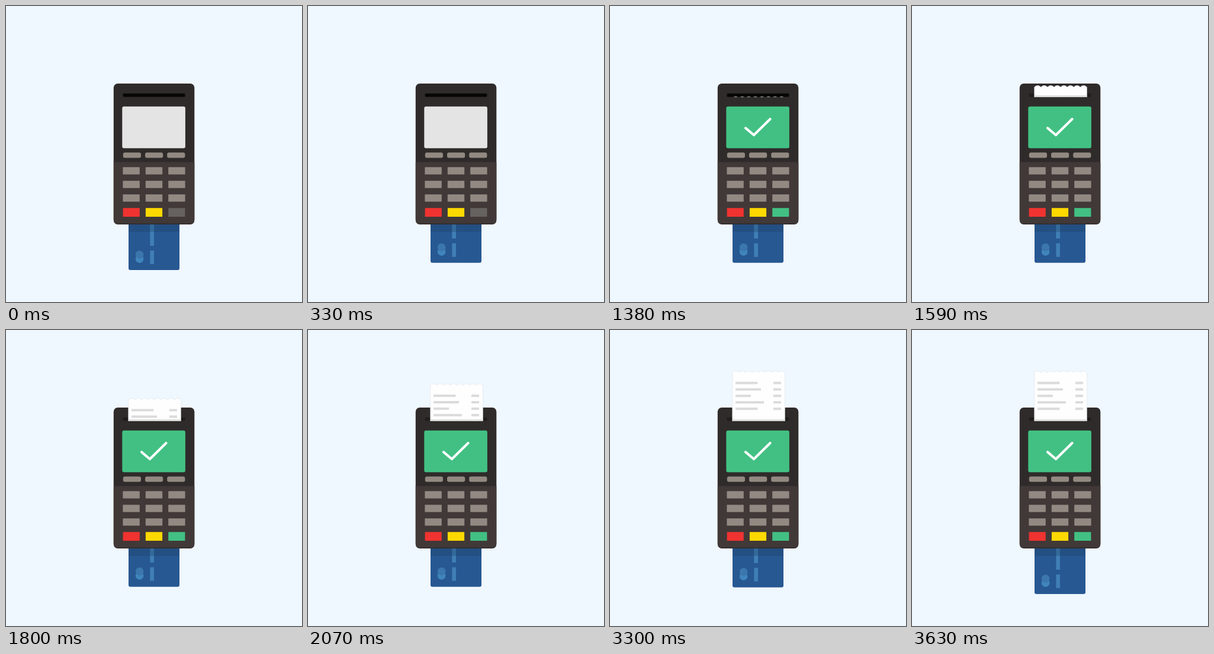
An HTML page for the animation above (4530 ms loop, 500 by 500 pixels).

```html
<!DOCTYPE html>
<html lang="en">
<head>
<meta charset="utf-8">
<title>Card payment</title>
<style>
  html, body { margin: 0; width: 100%; height: 100%; overflow: hidden; background: #eff7ff; }
  svg { display: block; width: 100%; height: 100%; }
</style>
</head>
<body>
<svg viewBox="0 0 500 500">
  <defs>
    <clipPath id="exit"><rect x="190" y="40" width="120" height="113.8"/></clipPath>
  </defs>

  <g id="card">
    <rect x="207" y="340" width="86" height="106" rx="3" fill="#275892"/>
    <path d="M246.7 350V405M246.7 413V436" stroke="#3f7fb5" stroke-width="6.6"/>
    <circle cx="225.6" cy="427.2" r="6.8" fill="#4085bd"/>
    <circle cx="225.6" cy="420" r="6.8" fill="#3b77ac"/>
  </g>
  <rect x="207" y="366" width="86" height="15.5" fill="#1c3a5c" opacity=".3"/>

  <rect x="181.8" y="131" width="136.5" height="238" rx="7" fill="#2f2b2a"/>
  <path d="M181.8 263.5H318.3V360Q318.3 367.5 311 367.5H189Q181.8 367.5 181.8 360Z" fill="#413938"/>
  <rect id="slot" x="197.6" y="147.8" width="104.8" height="5.8" rx="1.5"/>
  <rect id="screen" x="196.3" y="169.8" width="106.6" height="70.4" rx="3"/>
  <path id="check" d="M-21 1.2L-7 13L20.5 -14" fill="none" stroke="#fff" stroke-width="4.2"
        stroke-linecap="round" stroke-linejoin="round"/>
  <g id="keys"></g>

  <g clip-path="url(#exit)">
    <g id="receipt"></g>
    <rect id="fold" x="206.8" y="151" width="88.6" height="3" fill="#dcdddd"/>
  </g>
</svg>

<script>
const LOOP = 4530;
const el = id => document.getElementById(id);
const progress = (t, start, end) => Math.min(1, Math.max(0, (t - start) / (end - start)));
const mix = (a, b, p) => `rgb(${a.map((v, i) => Math.round(v + (b[i] - v) * p))})`;

const GREY = [102, 98, 96], PALE = [228, 228, 228], GREEN = [66, 192, 131];

function addRect(parent, x, y, width, height, fill, rx = 0) {
  const rect = document.createElementNS("http://www.w3.org/2000/svg", "rect");
  for (const [name, value] of Object.entries({ x, y, width, height, fill, rx })) {
    rect.setAttribute(name, value);
  }
  parent.append(rect);
  return rect;
}

function buildKeys() {
  const keys = el("keys"), plain = "#928a82";
  for (let col = 0; col < 3; col++) {
    addRect(keys, 197.8 + col * 37.2, 247.6, 30.2, 9, plain, 3);
    for (let row = 0; row < 3; row++) {
      addRect(keys, 197.4 + col * 38.4, 272.2 + row * 23, 28.4, 12.4, plain, .5);
    }
  }
  return ["#f03330", "#fed900", "#666260"].map((fill, col) =>
    addRect(keys, 197.6 + col * 38.3, 341.3, 28.2, 14.7, fill, .5))[2];
}

// Receipt in its fully printed position.
function buildReceipt() {
  const left = 206.7, right = 295.4, tooth = (right - left) / 8;
  let outline = `M${left} 165V72`;
  for (let i = 0; i < 8; i++) outline += `q${tooth / 2} -5.5 ${tooth} 0`;
  outline += "V165Z";
  const receipt = el("receipt");
  receipt.innerHTML = `<path d="${outline}" fill="#fefefe" stroke="#dde3e8" stroke-width=".6"/>`;
  [37.3, 43, 26, 48, 37.3].forEach((width, i) => {
    const y = 87.5 + i * 10.9;
    addRect(receipt, 212, y, width, 4, "#dadbda");
    addRect(receipt, 276, y, 13, 4, "#dadbda");
  });
}

const okKey = buildKeys();
buildReceipt();

function draw(t) {
  const inserted = progress(t, 0, 330) - progress(t, 3270, 3630);
  el("card").setAttribute("transform", `translate(0 ${-12.3 * inserted})`);

  el("screen").setAttribute("fill", mix(PALE, GREEN, progress(t, 600, 960)));
  const scale = progress(t, 600, 1160);
  el("check").setAttribute("transform", `translate(250 205) scale(${scale})`);
  el("check").setAttribute("visibility", scale ? "visible" : "hidden");
  okKey.setAttribute("fill", t >= 2310 && t < 3300
    ? "#5c9b4d" : mix(GREY, GREEN, progress(t, 870, 1170)));

  const printed = progress(t, 1380, 2310);
  el("receipt").setAttribute("transform", `translate(0 ${84 * (1 - printed)})`);
  el("receipt").setAttribute("visibility", t >= 1380 ? "visible" : "hidden");
  el("fold").setAttribute("visibility", t >= 1440 ? "visible" : "hidden");
  el("slot").setAttribute("fill", t < 1440 ? "#070606" : "#201d1c");
}

const start = performance.now();
function tick() {
  draw((performance.now() - start) % LOOP);
  requestAnimationFrame(tick);
}
tick();
</script>
</body>
</html>
```
